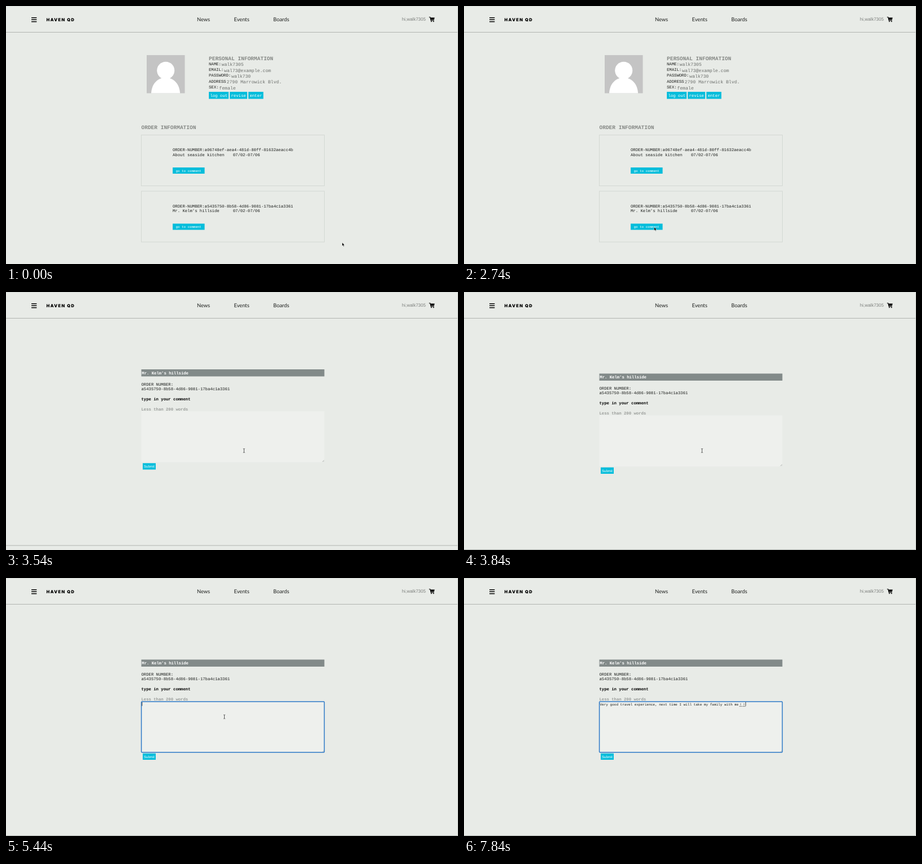
These frames come from a looping animation (800x457 px, 8 s). An HTML page:

```html
<!DOCTYPE html>
<html lang="en">
<head>
<meta charset="utf-8">
<title>Order comment</title>
<style>
html, body { margin: 0; width: 100%; height: 100%; overflow: hidden; background: #e8ebe7; }
svg { display: block; width: 800px; height: 457px; }
text { font: 7.25px "Liberation Mono", monospace; fill: #1c1e1c; white-space: pre; text-rendering: geometricPrecision; }
.nav { font: 9.3px Lato, sans-serif; }
.brand { font: 900 7.5px Inter, sans-serif; letter-spacing: 1.3px; fill: #000; }
.user { font: 8px "Liberation Sans", sans-serif; fill: #7c7f7c; }
.head { font-size: 9.5px; font-weight: bold; fill: #858885; }
.value { font-size: 8.15px; fill: #6d706d; }
.bold { font-weight: bold; fill: #000; }
.hint { font-weight: bold; fill: #9a9d9a; }
.light { fill: #fff; }
.small { font-size: 5.8px; }
.typed { font-size: 6.03px; }
.sans { font: 6.1px "Liberation Sans", sans-serif; }
.btn { fill: #05bddb; }
.box { fill: none; stroke: #d3d8d3; }
.rule { stroke: #b0b4b0; }
</style>
</head>
<body>
<svg viewBox="0 0 800 457">
  <rect width="800" height="457" fill="#e8ebe7"/>

  <g id="orders">
    <rect x="249" y="87" width="67.5" height="67.5" fill="#c4c4c4"/>
    <path d="M257 154.5C258 137 269 127 282.5 127S307 137 308 154.5Z" fill="#fff"/>
    <circle cx="282.7" cy="114.2" r="15.5" fill="#fff"/>
    <text class="head" x="359" y="95.7">PERSONAL INFORMATION</text>
    <g id="profile"></g>
    <rect class="btn" x="359" y="152" width="35" height="12.5"/>
    <rect class="btn" x="396" y="152" width="31" height="12.5"/>
    <rect class="btn" x="429" y="152" width="26.5" height="12.5"/>
    <text class="light" x="361.4" y="160.6">log out</text>
    <text class="light" x="398.5" y="160.6">revise</text>
    <text class="light" x="431.4" y="160.6">enter</text>
    <text class="head" x="239.5" y="217.7">ORDER INFORMATION</text>
    <g id="cards"></g>
  </g>

  <g id="detail">
    <rect x="239.5" y="144.5" width="324" height="12.5" fill="#828a89"/>
    <text class="bold light" x="240.3" y="153.3">Mr. Kelm's hillside</text>
    <text x="239.5" y="173.2">ORDER NUMBER:</text>
    <text x="239.5" y="181.4">a5435750-8b58-4d86-9081-17ba4c1a3361</text>
    <text class="bold" x="239.5" y="199">type in your comment</text>
    <text class="hint" x="239.5" y="217">Less than 200 words</text>
    <rect x="239.5" y="218.7" width="324" height="90.3" fill="#eef0ed"/>
    <path d="M560 308.3l3-3M562 308.3l1-1" stroke="#858885" stroke-width=".6"/>
    <rect id="ring" x="239.6" y="219" width="323.8" height="89.8" rx="1" fill="none" stroke="#2d79c7" stroke-width="1.5"/>
    <text id="typed" class="typed" x="240.5" y="226">Very good travel experience, next time I will take my family with me</text>
    <g id="marks"></g>
    <path id="caret" d="M0 219.8v6.8" stroke="#222" stroke-width=".8"/>
    <rect class="btn" x="242" y="310.7" width="23" height="11.3"/>
    <text class="sans light" x="244" y="318.5">Submit</text>
    <path class="rule" d="M0 456.5H800"/>
    <path d="M401.5 465V500" stroke="#d3d8d3"/>
    <text class="sans bold" x="548" y="473.6" style="font-size:7.2px">About Us</text>
  </g>

  <path class="rule" d="M0 46.5H800"/>
  <path d="M0 .5H800" stroke="#dadeda"/>
  <path d="M799.5 0V457" stroke="#ccd0cc"/>
  <path d="M45 20.7h9.3M45 24.2h9.3M45 27.7h9.3" stroke="#000" stroke-width="1.6"/>
  <text class="brand" x="71.5" y="26.6">HAVEN QD</text>
  <text class="nav" x="338" y="26.8">News</text>
  <text class="nav" x="403.5" y="26.8">Events</text>
  <text class="nav" x="473" y="26.8">Boards</text>
  <text class="user" x="700.7" y="26.3">hi,walk7305</text>
  <path d="M748.7 19.7h2l1.4 6h5.4" fill="none" stroke="#000" stroke-width="1.1"/>
  <path d="M750.6 20.4h8l-1 4h-6.2z"/>
  <circle cx="752.8" cy="27.2" r="1"/><circle cx="756.7" cy="27.2" r="1"/>

  <g id="cursor">
    <path d="M0 0V6L1.4 4.8L2.4 7L3.4 6.5L2.5 4.4H4.2Z" stroke="#fff" stroke-width=".4"/>
    <path d="M-.7 4.5V-3.3Q-.7-4.3 .2-4.3T1.1-3.3V0L4.3 .8Q4.9 1 4.8 2L4.2 6.5H-.4L-2.8 2.6Q-2.8 1.2-.7 2.6Z" fill="#fff" stroke="#000" stroke-width=".8"/>
    <path d="M-1.5-3.5Q0-3.5 0-2.6Q0-3.5 1.5-3.5M0-2.6V2.6M-1.5 3.5Q0 3.5 0 2.6Q0 3.5 1.5 3.5" fill="none" stroke="#333" stroke-width=".8"/>
  </g>
</svg>
<script>
const LOOP = 8000;
const $ = id => document.getElementById(id);
const show = (el, on) => el.setAttribute('visibility', on ? 'inherit' : 'hidden');

const profile = [
  ['NAME:', 'walk7305', 381.5], ['EMAIL:', 'wal73@example.com', 386],
  ['PASSWORD:', 'walk730', 399], ['ADDRESS', '2790 Marrowick Blvd.', 390.5],
  ['SEX:', 'female', 377.3]
];
$('profile').innerHTML = profile.map(([label, value, x], i) => {
  const y = 104.5 + i * 10.35;
  return `<text x="359" y="${y}">${label}</text><text class="value" x="${x}" y="${y + 1.7}">${value}</text>`;
}).join('');

const cards = [
  [228.5, 'a06748ef-aea4-481d-80ff-81632aeacc4b', 'About seaside kitchen'],
  [328, 'a5435750-8b58-4d86-9081-17ba4c1a3361', "Mr. Kelm's hillside"]
];
$('cards').innerHTML = cards.map(([y, id, name]) => `<g transform="translate(0 ${y})">
  <rect class="box" x="239.5" y="0" width="324" height="90"/>
  <text x="295" y="28.7">ORDER-NUMBER:${id}</text>
  <text x="295" y="37">${name}</text><text x="401.7" y="37">07/02-07/06</text>
  <rect class="btn" x="295" y="57.5" width="56.5" height="11"/>
  <text class="small light" x="300.6" y="65">go to comment</text></g>`).join('');

$('marks').innerHTML = [487, 493].map(x =>
  `<g><text class="typed" x="${x + 1}" y="226">!</text><path d="M${x} 227.3h5.4" stroke="#333" stroke-width=".6"/></g>`).join('');

// Pointer moves: start, end, number of steps, then the corners of the path
const moves = [
  [170, 170, 1, [595, 419], [595.5, 419.4]],
  [320, 940, 10, [595.5, 419.4], [371, 159], [436, 158.5]],
  [1140, 1390, 6, [436, 158.5], [334.5, 388], [336.7, 391.7]],
  [3190, 3540, 6, [336.7, 391.7], [421.3, 281]],
  [4190, 4290, 2, [421.3, 281], [404, 262]],
  [4540, 4790, 4, [404, 262], [386.5, 245.8]],
  [6590, 6840, 5, [386.5, 245.8], [383, 245.5], [386.5, 245.8]]
];

function along(points, p) {
  const q = p * (points.length - 1);
  const i = Math.min(Math.floor(q), points.length - 2);
  const [a, b] = [points[i], points[i + 1]];
  return a.map((v, k) => v + (b[k] - v) * (q - i));
}

// Share of a stepped change done by time t
function stepped(t, start, end, n) {
  if (t < start) return 0;
  if (t >= end) return 1;
  return (Math.floor((t - start) * (n - 1) / (end - start)) + 1) / n;
}

function pointer(t) {
  const [start, end, n, ...points] = moves.filter(m => m[0] <= t).pop() || moves[0];
  return along(points, stepped(t, start, end, n));
}

const at = (t, table) => table.filter(row => row[0] <= t).pop()[1];
const caretOn = [[0, 0], [4740, 1], [5240, 0], [5440, 1], [6640, 0], [7190, 1]];
const caretX = [[0, 240.9], [5990, 486.7], [7590, 492.7], [7840, 498.6]];

function draw(t) {
  const second = t >= 2890;
  show($('orders'), !second);
  show($('detail'), second);

  const scroll = -13 + 5.5 * stepped(t, 3340, 3540, 4) + 7.5 * stepped(t, 3790, 3840, 2);
  $('detail').setAttribute('transform', `translate(0 ${scroll})`);
  show($('ring'), second && t >= 4640);
  show($('typed'), second && t >= 5990);
  [...$('marks').children].forEach((m, i) => show(m, t >= [7590, 7840][i]));
  show($('caret'), at(t, caretOn));
  $('caret').setAttribute('transform', `translate(${at(t, caretX)} 0)`);

  const [x, y] = pointer(t);
  const shape = second && y < 296 ? 2 : t >= 2190 && t < 2740 ? 1 : 0;
  $('cursor').setAttribute('transform', `translate(${x} ${y})`);
  [...$('cursor').children].forEach((c, i) => show(c, i === shape && t < 7590));
}

const began = performance.now();
function tick() {
  draw((performance.now() - began) % LOOP);
  requestAnimationFrame(tick);
}
tick();
</script>
</body>
</html>
```
